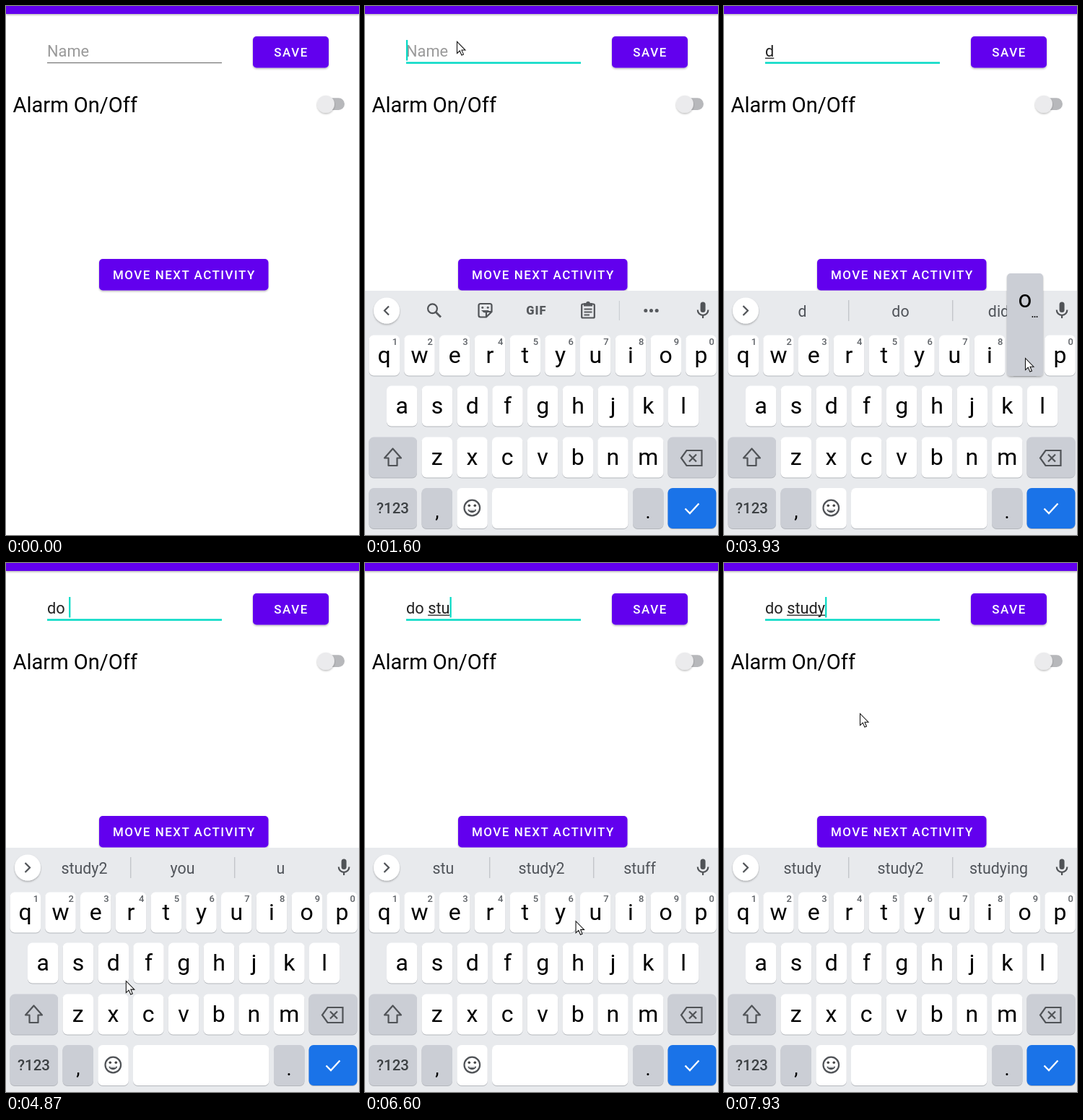
An HTML page for the animation above (8 s loop, 489 px wide and 732 px high).

```html
<!DOCTYPE html>
<html lang="en">
<head>
<meta charset="utf-8">
<title>Alarm form</title>
<style>
html, body { margin: 0; width: 100%; height: 100%; overflow: hidden; background: #fff; }
svg { display: block; width: 489px; height: 732px; font-family: Roboto, sans-serif; }
text { white-space: pre; }
.mid { text-anchor: middle; }
.btn { font-size: 16.95px; font-weight: 500; letter-spacing: 1.51px; fill: #fff; }
.field { font-size: 21.8px; }
.line { fill: none; stroke: #505357; stroke-width: 2.2; }
</style>
</head>
<body>
<svg id="stage" viewBox="0 0 489 732"></svg>
<script>
const LOOP = 8000, FPS = 15;
const PITCH = 48.75, TEAL = '#03dac5', PURPLE = '#6200ee';
const stage = document.getElementById('stage');
const $ = id => document.getElementById(id);

const rect = (x, y, w, h, fill, r = 0, more = '') =>
  `<rect x="${x}" y="${y}" width="${w}" height="${h}" rx="${r}" fill="${fill}" ${more}/>`;
const text = (x, y, str, more = '') => `<text x="${x}" y="${y}" ${more}>${str}</text>`;
const dot = (x, y, r, fill, more = '') => `<circle cx="${x}" cy="${y}" r="${r}" fill="${fill}" ${more}/>`;
const path = (d, more = 'class="line"') => `<path d="${d}" ${more}/>`;

function button(x, y, w, label, tx) {
  return rect(x, y, w, 43.5, PURPLE, 5, 'filter="url(#drop)"') +
    text(tx, y + 28, label, 'class="btn"');
}

// Keyboard geometry
const rows = [['qwertyuiop', 5.5, 455.5], ['asdfghjkl', 30, 525.5], ['zxcvbnm', 78.5, 596.5]];
const keyPos = {};
rows.forEach(([chars, x, y]) => [...chars].forEach((c, i) => { keyPos[c] = [x + i * PITCH, y]; }));

function key(x, y, w, fill = '#fff', id = '') {
  return rect(x, y + 1, w, 56, '#b4b7bc', 6.5) +
    rect(x, y, w, 56, fill, 6.5, id && `id="${id}"`);
}

function letterKeys() {
  return Object.entries(keyPos).map(([c, [x, y]], i) =>
    key(x, y, 42.5) +
    text(x + 21.2, y + 38, c, 'class="mid" font-size="32"') +
    (i < 10 ? text(x + 36, y + 13.5, (i + 1) % 10, 'class="mid" font-size="13" font-weight="500" fill="#5f6368"') : '')
  ).join('');
}

function functionKeys() {
  const grey = '#cbced5', y3 = 596.5, y4 = 667;
  return key(5.5, y3, 66.5, grey) +
    path('M38.5 612.5L50 625.5H44.5V636H32.5V625.5H27Z', 'class="line" stroke-linejoin="round"') +
    key(419.5, y3, 67, grey) +
    path('M445.5 615H466.5V636H445.5L438 625.5ZM449 620.5L459 630.5M459 620.5L449 630.5') +
    key(5.5, y4, 66.5, grey) +
    text(38.5, 702, '?123', 'class="mid" font-size="20.5" font-weight="500" fill="#3c4043"') +
    key(78.5, y4, 42.5, grey) + text(99.8, 708, ',', 'class="mid" font-size="27"') +
    key(127.3, y4, 42.5) +
    dot(148.3, 694.5, 10.8, 'none', 'class="line"') +
    dot(144.3, 691.3, 1.8, '#444') + dot(152.3, 691.3, 1.8, '#444') +
    path('M142.3 696.8A6.3 6.3 0 0 0 154.3 696.8Z', 'fill="#505357"') +
    path('M144.5 697.5H152', 'stroke="#fff" stroke-width="1.2"') +
    key(176, y4, 188.5, '#fff', 'space') +
    key(371, y4, 42.5, grey) + text(392, 709, '.', 'class="mid" font-size="27"') +
    key(419.5, y4, 67, '#1a73e8') +
    path('M443.5 695.5L450 702L462.5 688.5', 'fill="none" stroke="#fff" stroke-width="2.3"');
}

function tools() {
  const ink = '#56595d';
  return `<g id="tools">` +
    path('M33 415.5L27 421.5L33 427.5') +
    dot(93.5, 418.7, 6.4, 'none', 'class="line"') +
    path('M98 423.5L105 430.5', `stroke="${ink}" stroke-width="2.8"`) +
    path('M160 412H173Q175.5 412 175.5 414.5V423L168 430.5H160Q157.5 430.5 157.5 428V414.5Q157.5 412 160 412ZM175 423H170Q168 423 168 425V430') +
    dot(162.8, 417.3, 1.5, ink) + dot(170.2, 417.3, 1.5, ink) +
    path('M161 421Q166.5 428 171.8 421Z', `fill="${ink}"`) +
    text(237.5, 427, 'GIF', `class="mid" font-size="16.5" font-weight="900" letter-spacing="1" fill="${ink}"`) +
    rect(300.2, 412.5, 17.6, 19, 'none', 1.5, 'class="line"') +
    rect(303, 411, 12, 4.5, ink) + dot(309, 411.5, 2.8, ink) +
    path('M303.5 419.5H314.5M303.5 423.5H314.5M303.5 427.5H311', `stroke="${ink}" stroke-width="1.9"`) +
    rect(351.8, 408, 1.2, 27, '#cdd0d4') +
    [388.8, 396.5, 404.2].map(x => dot(x, 421.5, 2.5, ink)).join('') +
    `</g>`;
}

function suggestions() {
  return `<g id="words">` + path('M26.5 415L33 421.5L26.5 428') +
    [0, 1, 2].map(i => text(108.5 + 136 * i, 429.5, '', `id="word${i}" class="mid" font-size="21.4" fill="#50545a"`)).join('') +
    rect(172, 407, 1.4, 29, '#c3c6ca') + rect(316, 407, 1.4, 29, '#c3c6ca') + `</g>`;
}

stage.innerHTML = `<defs>
  <filter id="drop" x="-20%" y="-20%" width="140%" height="150%">
    <feDropShadow dx="0" dy="1.5" stdDeviation="1.3" flood-opacity=".28"/>
  </filter></defs>` +
  rect(0, 0, 489, 732, '#fff') +
  rect(0, -9, 489, 20, PURPLE, 0, 'filter="url(#drop)"') +
  text(57, 70, 'Name', 'id="hint" class="field" fill="#9a9a9a"') +
  text(57, 70, '', 'id="typed" class="field" fill="#212121"') +
  rect(57, 71.6, 0, 1.3, '#212121', 0, 'id="under"') +
  rect(57, 78, 242, 1.2, '#757575', 0, 'id="base"') +
  rect(57, 47, 2.2, 28.5, TEAL, 0, 'id="caret"') +
  button(342, 42, 105, 'SAVE', 371.3) +
  text(9.5, 147, 'Alarm On/Off', 'font-size="29.06"') +
  rect(434, 127.3, 35, 16.7, '#b7b8bb', 8.3) +
  dot(443, 135.8, 12, '#ebebed', 'filter="url(#drop)"') +
  button(129, 350, 234.5, 'MOVE NEXT ACTIVITY', 148) +
  `<g id="board">` + rect(0, 394, 489, 340, '#e8eaed') +
  dot(30, 421.5, 18, '#fff', 'filter="url(#drop)"') +
  tools() + suggestions() +
  rect(464.6, 409.5, 7, 14.5, '#505357', 3.5) +
  path('M460.8 420.5A7.3 7.3 0 0 0 475.4 420.5M468.1 428V432') +
  letterKeys() + functionKeys() + `</g>` +
  `<g id="popup">` + rect(0, 0, 50, 142, '#cbced5', 5, 'filter="url(#drop)"') +
  text(25, 46.5, '', 'id="popChar" class="mid" font-size="33"') +
  text(38.5, 60.5, '…', 'id="popMore" class="mid" font-size="14" font-weight="500"') + `</g>` +
  path('M.5 .5V16.6L4.3 13.1L6.9 19.1L9.5 18L7 12.2H12Z', 'id="mouse" fill="#fff" stroke="#111" stroke-width="1.05"');

// Each press: key, time down, time up, suggestions that follow
const presses = [
  ['d', 3067, 3200, 'd do did'],
  ['o', 3800, 4000, 'do dog done'],
  [' ', 4533, 4667, 'study2 you u'],
  ['s', 5267, 5400, 's study2 sleep'],
  ['t', 5933, 6067, 'st study2 still'],
  ['u', 6400, 6533, 'stu study2 stuff'],
  ['d', 7133, 7200, 'stud study2 study'],
  ['y', 7467, 7600, 'study study2 studying']
];
const FOCUS = 1333;

// Pointer way points: time, x, y
const track = [
  [933, 141, 3], [1267, 127, 49], [1600, 127, 49], [1800, 124, 28], [2000, 118, 109],
  [2333, 118, 109], [2467, 212, 250], [2600, 226, 405], [2733, 168, 506], [2933, 150, 556],
  [3200, 150, 556], [3467, 250, 520], [3800, 417, 487], [4000, 417, 487], [4467, 250, 689],
  [4667, 250, 689], [4867, 166, 578], [5133, 99, 552], [5400, 99, 552], [5467, 106, 526],
  [5867, 222, 489], [6200, 222, 489], [6400, 314, 489], [6533, 312, 490], [6600, 292, 495],
  [6933, 150, 557], [7133, 150, 557], [7400, 272, 489], [7600, 272, 489], [7933, 188, 208]
];

function pointer(t) {
  const i = track.findIndex(p => p[0] > t);
  if (i < 0) return track[track.length - 1].slice(1);
  const [t0, x0, y0] = track[i - 1], [t1, x1, y1] = track[i];
  const k = (t - t0) / (t1 - t0);
  return [x0 + (x1 - x0) * k, y0 + (y1 - y0) * k];
}

const set = (id, attrs) => { for (const a in attrs) $(id).setAttribute(a, attrs[a]); };
const show = (id, on) => { $(id).style.display = on ? '' : 'none'; };

function drawField(t, done) {
  const value = done.map(p => p[0]).join('');
  const wordStart = value.lastIndexOf(' ') + 1;
  const typed = $('typed');
  typed.textContent = value;
  const width = n => n ? typed.getSubStringLength(0, n) : 0;
  const from = width(wordStart), end = width(value.length);
  const focused = t >= FOCUS;
  const since = t - (done.length ? done[done.length - 1][2] : FOCUS);
  show('hint', !value);
  set('under', { x: 57 + from, width: end - from });
  set('base', focused ? { y: 77.4, height: 2.5, fill: TEAL } : { y: 78, height: 1.2, fill: '#757575' });
  set('caret', { x: 57 + end });
  show('caret', focused && since % 1000 < 500);
}

function drawBoard(t, done, held) {
  const rise = Math.min(1, Math.max(0, (t - 1367) / 200));
  const ease = rise * rise * (3 - 2 * rise);
  set('board', { transform: `translate(0 ${338 * (1 - ease)})`, opacity: ease });
  show('tools', !done.length);
  show('words', done.length);
  if (done.length)
    done[done.length - 1][3].split(' ').forEach((w, i) => { $('word' + i).textContent = w; });

  const char = held && held[0];
  set('space', { fill: char === ' ' ? '#cbced5' : '#fff' });
  show('popup', char && char !== ' ');
  if (keyPos[char]) {
    const [x, y] = keyPos[char];
    set('popup', { transform: `translate(${x - 3.5} ${y - 85.5})` });
    $('popChar').textContent = char;
    show('popMore', 'osuy'.includes(char));
  }
}

function draw(time) {
  const t = Math.floor((time + 4) * FPS / 1000) * 1000 / FPS + 1;
  const done = presses.filter(p => t >= p[2]);
  const held = presses.find(p => t >= p[1] && t < p[2]);
  drawField(t, done);
  drawBoard(t, done, held);
  show('mouse', t >= track[0][0]);
  if (t >= track[0][0]) set('mouse', { transform: `translate(${pointer(t)})` });
}

const start = performance.now();
function tick() {
  draw((performance.now() - start) % LOOP);
  requestAnimationFrame(tick);
}
tick();
</script>
</body>
</html>
```
